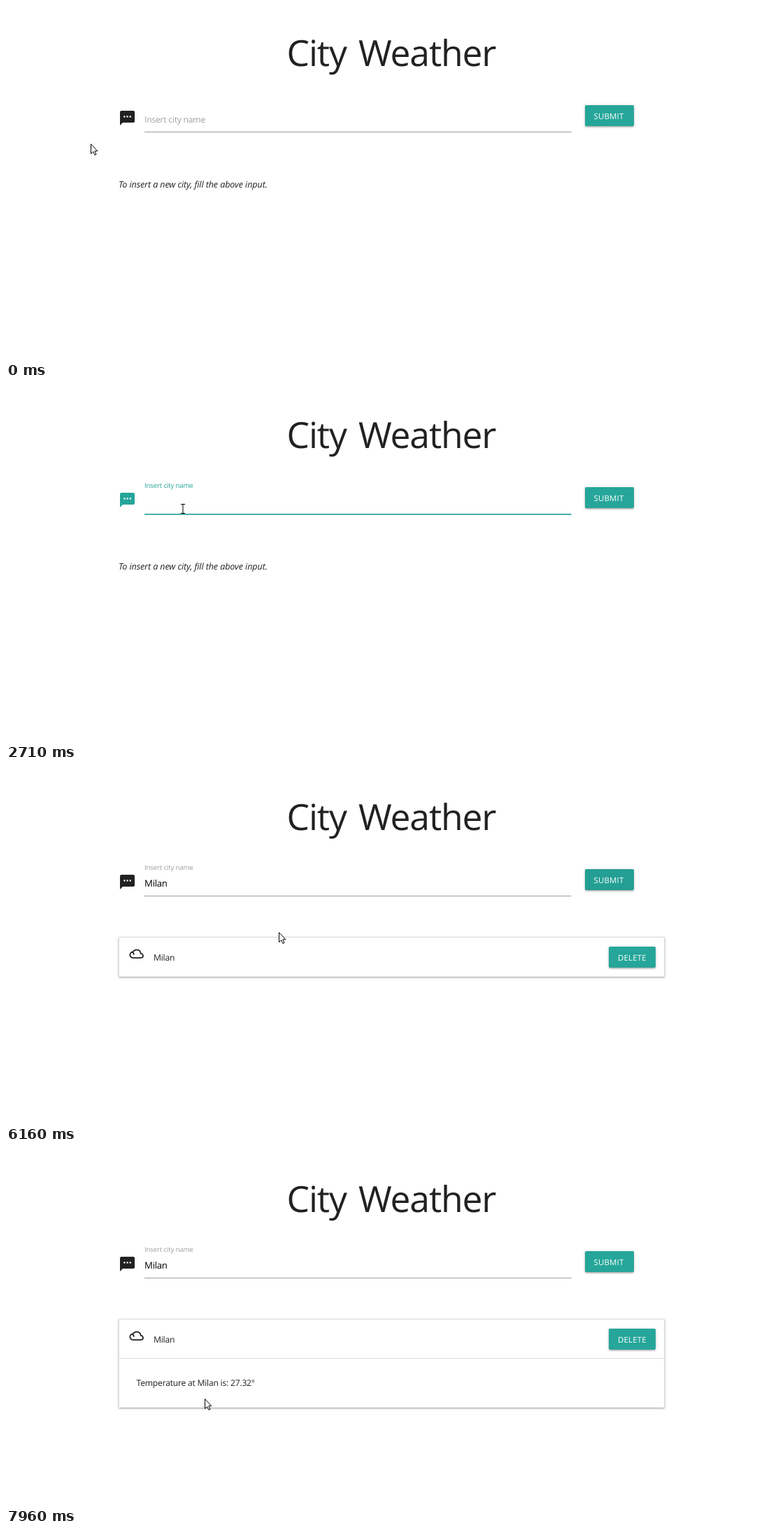
Recreate the animation shown at these times as an HTML page. Size 1104 by 507 pixels, loop 8 s.

```html
<!DOCTYPE html>
<html lang="en">
<head>
<meta charset="utf-8">
<title>City Weather</title>
<style>
  html, body { margin: 0; width: 100%; height: 100%; overflow: hidden; background: #fff; }
  div, svg { position: absolute; box-sizing: border-box; }
  svg { left: 0; top: 0; }
  .raised {
    box-shadow: 0 1.7px 1.7px rgba(0,0,0,.14), 0 2.5px .8px -1.7px rgba(0,0,0,.12), 0 .8px 4.2px rgba(0,0,0,.2);
  }
  .button { height: 30px; border-radius: 1.7px; background: #26a69a; overflow: hidden; }
  #submit { left: 828px; top: 142px; width: 70px; }
  #delete { left: 862px; top: 253px; width: 67px; }
  #card { left: 161px; top: 239px; width: 781px; border: 1px solid #ddd; border-bottom: 0; background: #fff; }
  #ripple { border-radius: 50%; background: #fff; }
  text {
    font: 12.2px "Open Sans", "Noto Sans", sans-serif;
    letter-spacing: -.02em; fill: #212121; text-rendering: geometricPrecision; white-space: pre;
  }
  #title { font-size: 51.5px; letter-spacing: -1.1px; word-spacing: 5px; }
  #hint { font-size: 12.6px; font-style: italic; letter-spacing: -.1px; }
  #typed { font-size: 13.2px; fill: #000; }
  .caption { font-size: 11.4px; letter-spacing: .2px; fill: #fff; }
  .cursor { fill: #fff; stroke: #000; stroke-linejoin: round; }
  .outline { fill: none; stroke: #212121; stroke-width: 1.75; }
</style>
</head>
<body>
<div id="card" class="raised"></div>
<div id="submit" class="button raised"><div id="ripple"></div></div>
<div id="delete" class="button raised"></div>

<svg width="1104" height="507">
  <clipPath id="bodyClip"><rect id="bodyArea" x="162" y="296" width="780"/></clipPath>

  <text id="title" x="401.5" y="86">City Weather</text>
  <g id="chatIcon">
    <rect x="163" y="150" width="21" height="17" rx="2"/>
    <path d="M163 152V171L168 166Z"/>
    <path d="M168.3 158.4h10.6" stroke="#fff" stroke-width="2.1" stroke-dasharray="2.1"/>
  </g>
  <text id="label">Insert city name</text>
  <text id="typed" x="198" y="166.5"></text>
  <rect id="caret" y="152" width="1" height="18"/>
  <rect id="underline" x="198" y="180" width="610.5"/>
  <text class="caption" x="840.5" y="161.5">SUBMIT</text>

  <text id="hint" x="161" y="260">To insert a new city, fill the above input.</text>
  <g id="item">
    <path class="outline" transform="translate(176.5 252.5)" d="M5.2 16.5a4.3 4.3 0 0 1 0-8.7a6 6 0 0 1 11 2.6a3 3 0 0 1 .4 6.1zM3.5 8q2.8 1 2.8 4.2"/>
    <text x="211" y="272.5">Milan</text>
    <text class="caption" x="875" y="272.5">DELETE</text>
    <g clip-path="url(#bodyClip)">
      <text id="report" x="186.5">Temperature at Milan is: 27.32°</text>
    </g>
    <rect id="divider" x="162" y="295" width="779" height="1" fill="#ddd"/>
  </g>

  <g id="pointer">
    <circle id="press" cx="-1" r="10" fill="#fff500" fill-opacity=".55"/>
    <path id="arrow" class="cursor" d="M.5 .7V14.6L3.7 11.6 5.9 16.4 8 15.5 5.9 10.8H9.9Z"/>
    <path id="beam" class="cursor" style="fill:none" d="M-3 -6.5H3M0 -6V6M-3 6.5H3"/>
    <path id="hand" class="cursor" d="M-1.5 12V1.5a1.5 1.5 0 0 1 3 0V6.5L8 7.7Q9.6 8 9.6 10V14.5L8 19.5H.5L-4.5 12Q-4 9 -1.5 12Z"/>
  </g>
</svg>

<script>
const LOOP = 8000;
const TICK = 77.56, FIRST_TICK = 980;   // the screen refreshes in even steps
const FOCUS_AT = 1833, TYPE_AT = 2700, SUBMIT_AT = 5080, LISTED_AT = 5390, OPEN_AT = 6930;
const CITY = 'Milan';
const DARK = [33, 33, 33], GREY = [158, 158, 158], TEAL = [38, 166, 154];
const HOVER = [43, 187, 173], FOCUSED = [36, 159, 148];

const glides = [
  { start: 900, end: 1610, x: 253, y: 173 },
  { start: 4030, end: 4520, x: 853, y: 163 },
  { start: 5400, end: 6100, x: 389, y: 232 },
  { start: 6100, end: 6400, x: 262, y: 268 },
  { start: 7790, end: 7960, x: 284, y: 353 }
];

const $ = Object.fromEntries([...document.querySelectorAll('[id]')].map(el => [el.id, el]));
const ramp = (t, start, end) => Math.min(1, Math.max(0, (t - start) / (end - start)));
const lerp = (a, b, p) => a + (b - a) * p;
const mix = (a, b, p) => a.map((v, i) => lerp(v, b[i], p));
const rgb = c => `rgb(${c.map(Math.round)})`;
const easeInOutCubic = p => p < .5 ? 4 * p ** 3 : 1 - 4 * (1 - p) ** 3;
const show = (el, on) => { el.style.display = on ? '' : 'none'; };
const set = (el, attrs) => { for (const k in attrs) el.setAttribute(k, attrs[k]); };
const snap = t => FIRST_TICK + Math.floor((t - FIRST_TICK) / TICK) * TICK;

function pointerAt(t) {
  let x = 121, y = 197;
  for (const glide of glides) {
    const p = ramp(t, glide.start, glide.end);
    x = lerp(x, glide.x, p);
    y = lerp(y, glide.y, p);
  }
  return [x, y];
}

function drawField(t) {
  const raised = ramp(t, FOCUS_AT, FOCUS_AT + 200);
  const focus = raised * (1 - ramp(t, SUBMIT_AT, SUBMIT_AT + 130));
  const accent = rgb(mix(GREY, TEAL, focus));
  set($.chatIcon, { fill: rgb(mix(DARK, TEAL, focus)) });
  set($.label, { transform: `translate(198 ${lerp(166.5, 142.5, raised)}) scale(${lerp(1, .8, raised)})` });
  $.label.style.fill = accent;
  set($.underline, { fill: accent, height: focus > .5 ? 1.7 : 1 });

  const typing = ramp(t, TYPE_AT, TYPE_AT + 540);
  $.typed.textContent = t < TYPE_AT ? '' : CITY.slice(0, 1 + Math.floor(typing * (CITY.length - 1)));
  set($.caret, { x: 198 + Math.round($.typed.getComputedTextLength()) });
  const blinkOn = Math.floor((t - FOCUS_AT - 47) / 510) % 2 === 0;
  const busy = typing > 0 && typing < 1;
  show($.caret, t > FOCUS_AT + 47 && t < SUBMIT_AT && (blinkOn || busy));
}

function drawSubmit(t) {
  const hover = ramp(t, 4520, 4800) * (1 - ramp(t, 5450, 5800));
  const pressed = ramp(t, SUBMIT_AT, SUBMIT_AT + 200) * (1 - ramp(t, OPEN_AT, OPEN_AT + 250));
  $.submit.style.background = rgb(mix(mix(TEAL, FOCUSED, pressed), HOVER, hover));

  const radius = Math.max(0, (t - SUBMIT_AT) * .16);
  Object.assign($.ripple.style, {
    left: 25 - radius + 'px', top: 19 - radius + 'px',
    width: 2 * radius + 'px', height: 2 * radius + 'px',
    opacity: .2 * (1 - ramp(t, SUBMIT_AT + 200, SUBMIT_AT + 600))
  });
}

function drawCard(t) {
  const listed = t >= LISTED_AT;
  const open = easeInOutCubic(ramp(t, OPEN_AT + 175, OPEN_AT + 475));
  for (const el of [$.card, $.delete, $.item]) show(el, listed);
  show($.hint, !listed);
  $.card.style.height = 57 + 70 * open + 'px';
  set($.bodyArea, { height: 70 * open });
  set($.report, { y: 335 - 25 * (1 - Math.sqrt(open)) });
  show($.divider, open > 0);
}

function drawPointer(t) {
  const [x, y] = pointerAt(t);
  const inside = (left, top, right, bottom) => x >= left && x <= right && y >= top && y <= bottom;
  const overField = inside(198, 143, 808, 181);
  const overLink = inside(828, 142, 898, 172) || t >= LISTED_AT && inside(161, 240, 942, 296);
  set($.pointer, { transform: `translate(${Math.round(x)} ${Math.round(y)})` });
  show($.beam, overField);
  show($.hand, overLink);
  show($.arrow, !overField && !overLink);
  show($.press, [FOCUS_AT, SUBMIT_AT, OPEN_AT].some(click => t >= click && t < click + 240));
}

function frame(now) {
  const t = snap(now % LOOP);
  drawField(t);
  drawSubmit(t);
  drawCard(t);
  drawPointer(t);
  requestAnimationFrame(frame);
}
frame(performance.now());
</script>
</body>
</html>
```
